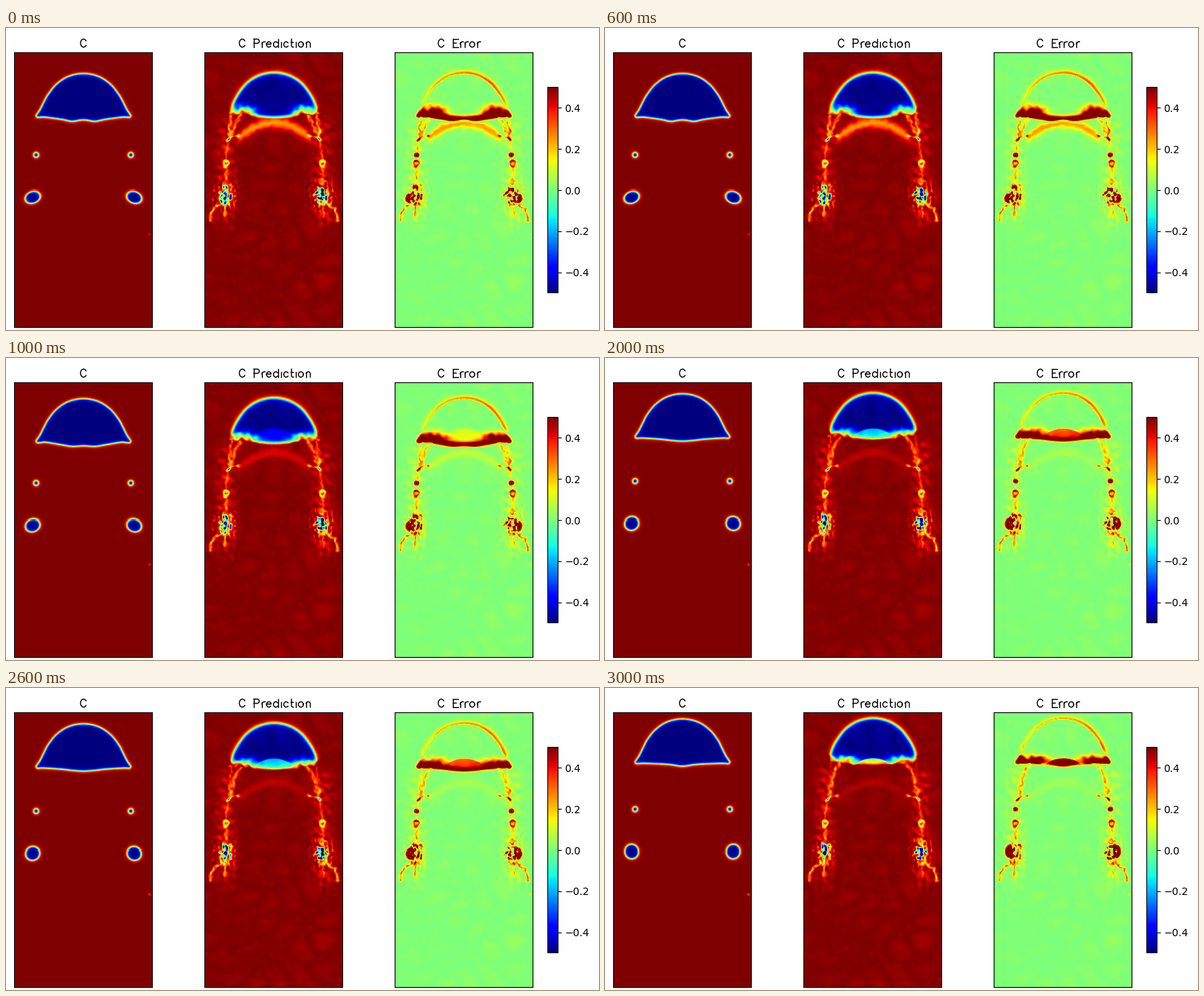
Write a matplotlib script that moves like this. It is 804x410 px and loops after 4000 ms.

```python
import numpy as np
import matplotlib.pyplot as plt
from matplotlib.animation import FuncAnimation
from matplotlib.path import Path

W, H, DPI = 804, 410, 100
LEFTS, TOP, PANEL_W, PANEL_H = (10.5, 268.5, 526.5), 33.5, 187, 373
STEPS = 4

# Grid in panel pixels; y is measured from the top of the stage.
X, Y = np.meshgrid(np.arange(PANEL_W) + 0.5, TOP + 0.5 + np.arange(PANEL_H))


def ripple(seed, scale):
    """Smooth random field with unit variance and wavelength near scale."""
    rng = np.random.default_rng(seed)
    field = np.zeros_like(X)
    for angle, phase, stretch in rng.uniform(0, 1, (18, 3)):
        k = 2 * np.pi / (scale * (0.7 + 0.8 * stretch))
        a = 2 * np.pi * angle
        field += np.cos(k * (X * np.cos(a) + Y * np.sin(a)) + 2 * np.pi * phase)
    return field / 3


def spline(points, n):
    """Catmull-Rom curve; the first and last points only steer the ends."""
    p = np.array(points, float)
    t = np.linspace(0, 1, n, endpoint=False)[:, None]
    parts = [0.5 * (2 * b + (c - a) * t + (2 * a - 5 * b + 4 * c - d) * t**2
                    + (3 * b - a - 3 * c + d) * t**3)
             for a, b, c, d in zip(p, p[1:], p[2:], p[3:])]
    return np.vstack(parts + [p[-2:-1]])


def distance(curve, u, y):
    d2 = np.full_like(u, np.inf)
    for cu, cy in curve:
        np.minimum(d2, (u - cu) ** 2 + (y - cy) ** 2, out=d2)
    return np.sqrt(d2)


def dome_distance(half, u):
    """Signed distance to a mirrored outline, negative inside."""
    before = (-half[1][0], half[1][1])
    after = (-half[-2][0], half[-2][1])
    curve = spline([before, *half, after], 24)
    outline = np.vstack([curve, (-5, curve[-1][1]), (-5, curve[0][1])])
    inside = Path(outline).contains_points(np.c_[u.ravel(), Y.ravel()])
    return np.where(inside.reshape(u.shape), -1, 1) * distance(curve, u, Y)


def bump(a, b=0):
    return np.exp(-a**2 - b**2)


def step(a):
    return 0.5 + 0.5 * np.tanh(a)


def streak(points, width, depth, u, y):
    curve = spline([points[0], *points, points[-1]], 14)
    return depth * bump(distance(curve, u, y) / width)


def truth(k):
    u = np.abs(X - 93.5)
    tip = 121 - 6.2 * k
    top = 63.5 - 6.6 * k
    sag = ((1.5, 4.5, 7, 5), (0.9, 4.5, 6.5, 5.8),
           (1.5, 3, 4.5, 5.5), (1.2, 2, 3, 5))[k]
    half = [(0, top), (20, top + 4), (36, top + 14.5), (47, top + 28),
            (52.5, tip - 20), (58, tip - 9), (62, tip - 3), (63.3, tip - 0.3),
            (61.5, tip + 1.5), (57, tip + 1.3)]
    half += [(du, tip + s) for du, s in zip((50, 28, 15, 0), sag)]
    d = dome_distance(half, u)

    d = np.minimum(d, np.hypot(u - 63.7, Y - 173.8 + 2.6 * k) - 3)
    du, dy = u - 68.3, Y - 230.5 + 2.5 * k
    tilt = np.radians(20)
    along = du * np.cos(tilt) + dy * np.sin(tilt)
    across = dy * np.cos(tilt) - du * np.sin(tilt)
    rx, ry = 10.2 - 0.4 * k, 7.6 + 0.55 * k
    q = np.hypot(along / rx, across / ry)
    d = np.minimum(d, (q - 1) * np.sqrt(rx * ry))
    speck = (0.1 + 0.03 * k) * bump((X - 182.5) / 1.7, (Y - 280.8) / 1.7)
    return 0.5 * np.tanh(d / 2.1) - speck


MOTTLE, GRAIN, FINE = ripple(3, 45), ripple(5, 13), ripple(8, 6)
WARP_X, WARP_Y = ripple(11, 11), ripple(12, 11)


def predict(k):
    u0 = np.abs(X - 94)
    u, y = u0 + 0.6 * WARP_X, Y + 0.6 * WARP_Y
    base, top = 118.8 - 5.2 * k, 62.2 - 6.5 * k
    half = [(0, top), (20, top + 4), (36, top + 14), (47, top + 27.5),
            (54, top + 40), (59.5, base - 4), (60.5, base - 1),
            (57, base + 1), (40, base + 1), (20, base + 2.5), (0, base + 3.7)]
    dome = 0.5 * np.tanh(dome_distance(half, u0) / 3)

    # Diluted corners and the lens entering from below.
    wing = 0.8 * bump((u - 40) / (14 + 2 * k), (y - base + 2) / (9 - 0.7 * k))
    wing += 0.5 * bump((u - 57) / 6, (y - base + 2) / 6)
    wing *= 0.9 + 0.12 * GRAIN
    lens = (0, 0.1, 0.3, 0.55)[k] * step((Y - 97 - u0**2 / 70) / 0.8)
    wing += lens * bump((u0 / 23) ** 2)

    # Wake below the dome.
    arch = step((48 - u) / 4) * bump((y - 130 - u**2 / 110) / 7)
    loss = (0.24, 0.07, 0.04, 0.03)[k] * arch
    y_blob = 228.5 - 1.7 * k
    strands = (
        ([(45, base + 1), (53, base + 15), (59, 150)], 2.6, 0.2),
        ([(57, base), (60, 135), (61, 152)], 2, 0.2 - 0.05 * k),
        ([(47, 147), (54, 149), (61, 153)], 1.2, 0.14),
        ([(61, 153), (64, 168), (66, 183)], 1.7, 0.13),
        ([(65, 190), (65, 205), (64, 220)], 2.8, 0.13),
        ([(67, 234), (74, 241), (83, 248), (86, 262)], 1.9, 0.27),
        ([(61, 236), (66, 246), (67, 256)], 1.3, 0.14),
    )
    for points, width, depth in strands:
        loss += streak(points, width, depth, u, y) * (1 + 0.25 * FINE)
    for cu, cy, r, depth in ((61, 153, 2.3, 0.33), (47, 147, 2, 0.24),
                             (64, 184, 2, 0.25), (67, 240, 2.2, 0.25)):
        loss += depth * bump((u - cu) / r, (y - cy) / r)
    loss += 0.28 * bump((np.hypot(u - 65, y - 185.5) - 3.6) / 1.3)

    # Torn vortex and its fragments.
    q = np.hypot((u0 + 1.8 * WARP_X - 65) / (7.2 - 0.4 * k),
                 (Y + 1.8 * WARP_Y - y_blob) / 8.5)
    loss += 0.95 * step((1 - q) * 2.5) * np.clip(0.72 + 0.35 * FINE, 0.1, 1.1)
    loss += 0.35 * bump(q / 1.9) * np.clip(FINE - 0.3, 0, 1)
    span = step((Y - base - 8) / 10) * step((268 - Y) / 12)
    loss += 0.045 * bump((u0 - 65) / 12) * span * np.clip(1 + 0.8 * GRAIN, 0, 3)

    value = np.minimum(np.minimum(dome + wing, 0.5), 0.5 - loss)
    value -= 0.009 * np.abs(MOTTLE + 0.4 * GRAIN) * np.sign(dome)
    return np.clip(value, -0.5, 0.5)


def arc(cx, cy, rx, ry, start, end):
    a = np.radians(np.linspace(start, end, 24))
    return list(zip(cx + rx * np.cos(a), cy + ry * np.sin(a)))


STEM = [(4, 14), (4, 0)]
TALL = [(4, 21), (4, 0)]
BOWL = arc(9, 7, 6, 7, 38, 322)
# Single-stroke lettering: advance width, then strokes.
GLYPHS = {
    " ": (16, []),
    "C": (21, [arc(10.8, 10.5, 7.8, 10.5, 35, 325)]),
    "P": (21, [TALL, [(4, 21)] + arc(12.5, 15.5, 5.5, 5.5, 90, -90) + [(4, 10)]]),
    "E": (19, [TALL, [(4, 21), (17, 21)], [(4, 11), (12, 11)], [(4, 0), (17, 0)]]),
    "r": (13, [STEM, arc(11, 8, 7, 6, 180, 80)]),
    "e": (18, [[(3, 8)] + arc(9, 7, 6, 7, 8, 322)]),
    "d": (19, [[(15, 21), (15, 0)], BOWL]),
    "i": (8, [STEM, [(4, 20.3), (4, 21.5)]]),
    "c": (18, [BOWL]),
    "t": (12, [[(5, 21)] + arc(9, 4, 4, 4, 180, 270) + [(10, 0)], [(2, 14), (9, 14)]]),
    "o": (19, [arc(9.5, 7, 6.5, 7, 0, 360)]),
    "n": (19, [STEM, [(4, 10)] + arc(9.7, 8.5, 5.3, 5.5, 150, 0) + [(15, 0)]]),
}


def letter(ax, text, x, baseline, scale=0.52):
    for char in text:
        advance, strokes = GLYPHS[char]
        for stroke in strokes:
            sx, sy = np.array(stroke).T
            ax.plot(x + scale * sx, baseline - scale * sy, color="black", lw=1)
        x += scale * advance


def pixel_axes(left, top, width, height):
    return fig.add_axes([left / W, 1 - (top + height) / H, width / W, height / H])


plt.rcParams["font.family"] = "DejaVu Sans"
# The small margin keeps the pixel size from rounding down.
fig = plt.figure(figsize=((W + 0.01) / DPI, (H + 0.01) / DPI), dpi=DPI,
                 facecolor="white")

fields = []
for k in range(STEPS):
    actual, guess = truth(k), predict(k)
    fields.append((actual, guess, np.abs(actual - guess)))

images = []
for left, field in zip(LEFTS, fields[0]):
    ax = pixel_axes(left, TOP, PANEL_W, PANEL_H)
    images.append(ax.imshow(field, cmap="jet", vmin=-0.5, vmax=0.5,
                            aspect="auto", interpolation="nearest"))
    ax.set(xticks=[], yticks=[])

bar = fig.colorbar(images[-1], cax=pixel_axes(733.5, 80.5, 14, 279))
bar.set_ticks([-0.4, -0.2, 0, 0.2, 0.4])

overlay = pixel_axes(0, 0, W, H)
overlay.set(xlim=(0, W), ylim=(H, 0))
overlay.axis("off")
for text, x in (("C", 99.5), ("C Prediction", 314.8), ("C Error", 584.5)):
    letter(overlay, text, x, 26)


def update(k):
    for image, field in zip(images, fields[k]):
        image.set_data(field)
    return images


animation = FuncAnimation(fig, update, frames=STEPS, interval=1000,
                          repeat=True, repeat_delay=0, blit=False)
plt.show()
```
